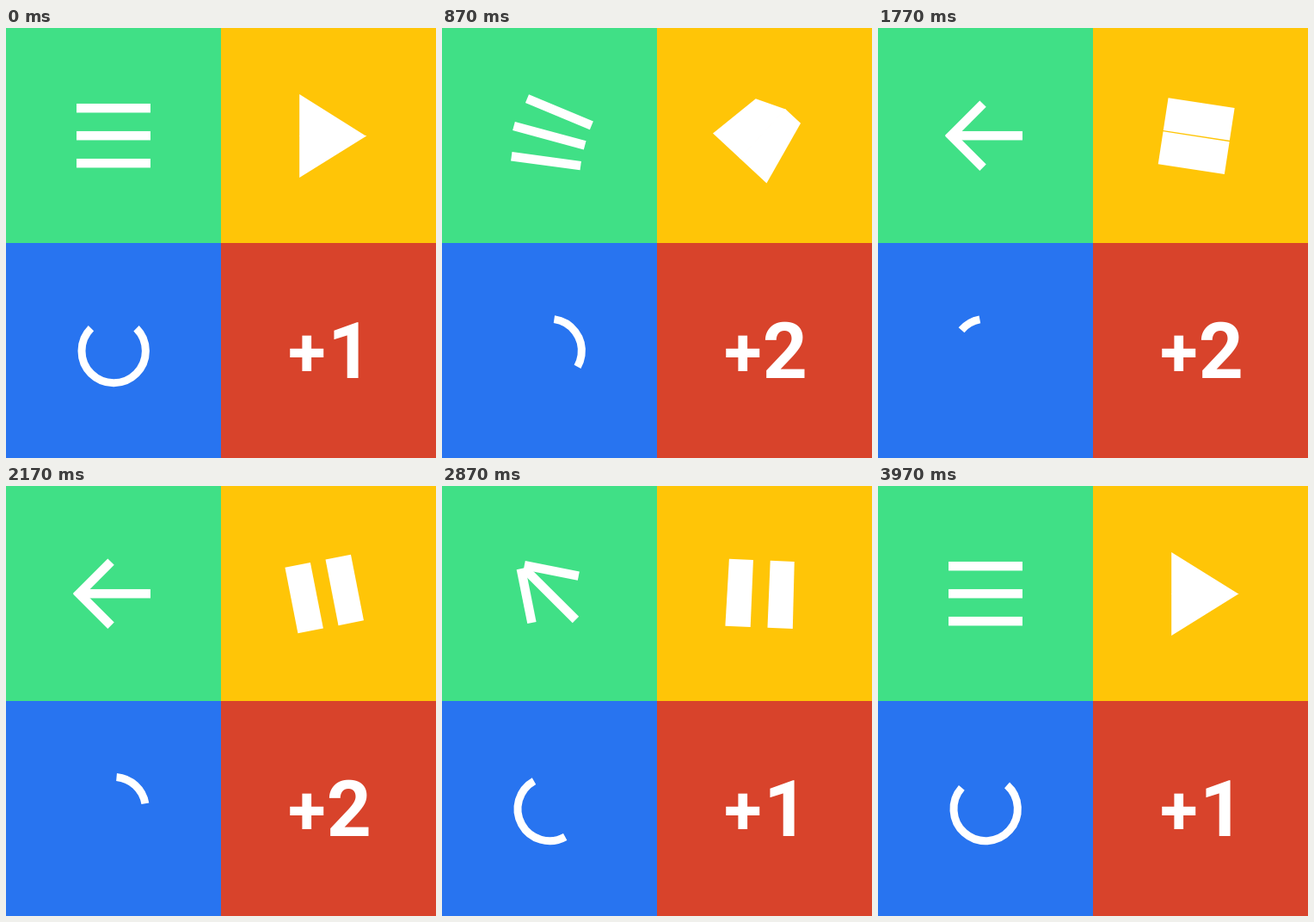
Recreate the animation shown at these times as an HTML page with a canvas. Size 500 by 500 pixels, loop 4.01 s.

```html
<!DOCTYPE html>
<html lang="en">
<head>
<meta charset="utf-8">
<title>Four icons</title>
<style>
  html, body { margin: 0; width: 100%; height: 100%; overflow: hidden; }
  canvas { display: block; width: 500px; height: 500px; }
</style>
</head>
<body>
<canvas id="stage" width="500" height="500"></canvas>
<script>
const LOOP = 4010;
const ctx = document.getElementById('stage').getContext('2d');
const mix = (a, b, p) => a + (b - a) * p;
const clamp = x => Math.min(1, Math.max(0, x));
const rad = deg => deg * Math.PI / 180;

function bezier(x1, y1, x2, y2) {
  const at = (a, b, s) => 3 * (1 - s) * (1 - s) * s * a + 3 * (1 - s) * s * s * b + s * s * s;
  return x => {
    if (x <= 0) return 0;
    if (x >= 1) return 1;
    let lo = 0, hi = 1;
    for (let i = 0; i < 24; i++) {
      const s = (lo + hi) / 2;
      if (at(x1, x2, s) < x) lo = s; else hi = s;
    }
    return at(y1, y2, lo);
  };
}

const standard = bezier(0.4, 0, 0.2, 1);
const quick = bezier(0.25, 0.1, 0.25, 1);
const early = bezier(0.27, 0.1, 0.4, 1);
const span = (t, start, length) => clamp((t - start) / length);

function place(x, y, deg, draw) {
  ctx.save();
  ctx.translate(x, y);
  ctx.rotate(rad(deg));
  draw();
  ctx.restore();
}

function background() {
  const tiles = [['#40e086', 0, 0], ['#ffc507', 250, 0], ['#2874f0', 0, 250], ['#d8432b', 250, 250]];
  for (const [color, x, y] of tiles) {
    ctx.fillStyle = color;
    ctx.fillRect(x, y, 250, 250);
  }
}

// Menu bars fold into an arrow while the whole icon turns.
function menu(t) {
  const there = span(t, 715, 940), back = span(t, 2631, 940);
  const turn = 180 * (standard(there) + standard(back));
  const fold = back > 0 ? 1 - standard(back) : early(there);
  const bar = (x, y, deg, length) => place(x, y, deg, () =>
    ctx.fillRect(-length / 2, -5.25, length, 10.5));
  place(125, 125.2, turn, () => {
    bar(mix(0, -1, fold), 0, 0, mix(86, 84, fold));
    for (const side of [-1, 1]) {
      bar(mix(0, 23.1, fold), side * mix(32, 16.9, fold), -side * 45 * fold, mix(86, 57, fold));
    }
  });
}

// Half outlines: outer back, outer front, inner front, inner back.
const PLAY = [[-29, 48.5], [49, 0], [49, -0.4], [-29, -0.4]];
const PLAY_BENT = [[-29, 48.5], [10, 24.2], [49, -0.4], [-29, -0.4]];
const STOP = [[-39, 39], [39, 39], [39, -0.4], [-39, -0.4]];
const PAUSE = [[-39, 39], [39, 39], [39, 10.3], [-39, 10.3]];

function half(from, to, p, side, inner = p) {
  ctx.beginPath();
  from.forEach(([x, y], i) =>
    ctx.lineTo(mix(x, to[i][0], p), side * mix(y, to[i][1], i > 1 ? inner : p)));
  ctx.fill();
}

function player(t) {
  const x = 370.2, y = 125.6;
  if (t < 1590) {
    const u = span(t, 533, 940), p = quick(u);
    place(x, y, -90 * standard(u), () => {
      half(PLAY_BENT, STOP, p, -1);
      half(PLAY, STOP, p, 1);
    });
  } else if (t < 2770) {
    const p = standard(span(t, 1606, 940));
    place(x, y, -180 + 90 * p, () => {
      half(STOP, PAUSE, p, -1);
      half(STOP, PAUSE, p, 1);
    });
  } else {
    const p = standard(span(t, 2778, 920));
    const closing = Math.min(1, p / 0.7);
    place(x, y, -90 + 90 * p, () => {
      half(PAUSE, PLAY, p, -1, closing);
      half(PAUSE, PLAY, p, 1, closing);
    });
  }
}

// The tail catches up in the first half of a cycle, the head runs ahead in the second.
function spinner(t) {
  const cycle = (t / (LOOP / 3)) % 1;
  const turn = 106 * cycle;
  const tail = -45 + turn + 254 * standard(clamp(cycle * 2));
  const head = 225 + turn + 254 * standard(clamp(cycle * 2 - 1));
  ctx.lineWidth = 9;
  ctx.beginPath();
  ctx.arc(125.2, 375.5, 37.2, rad(tail), rad(head));
  ctx.stroke();
}

function glyph(text, x, y, size) {
  ctx.font = `700 ${size}px Roboto, "Open Sans", sans-serif`;
  if ('fontStretch' in ctx) ctx.fontStretch = 'semi-condensed';
  const m = ctx.measureText(text);
  ctx.fillText(text,
    x - (m.actualBoundingBoxRight - m.actualBoundingBoxLeft) / 2,
    y + (m.actualBoundingBoxAscent - m.actualBoundingBoxDescent) / 2);
}

function counter(t) {
  glyph('+', 350, 377.5, 80);
  if (t >= 700 && t < 2620) glyph('2', 398.7, 374, 91);
  else glyph('1', 395.5, 374.5, 91);
}

function frame(now) {
  const t = now % LOOP;
  background();
  ctx.fillStyle = ctx.strokeStyle = '#fff';
  menu(t);
  player(t);
  spinner(t);
  counter(t);
  requestAnimationFrame(() => frame(performance.now() - begin));
}

const begin = performance.now();
frame(0);
</script>
</body>
</html>
```
